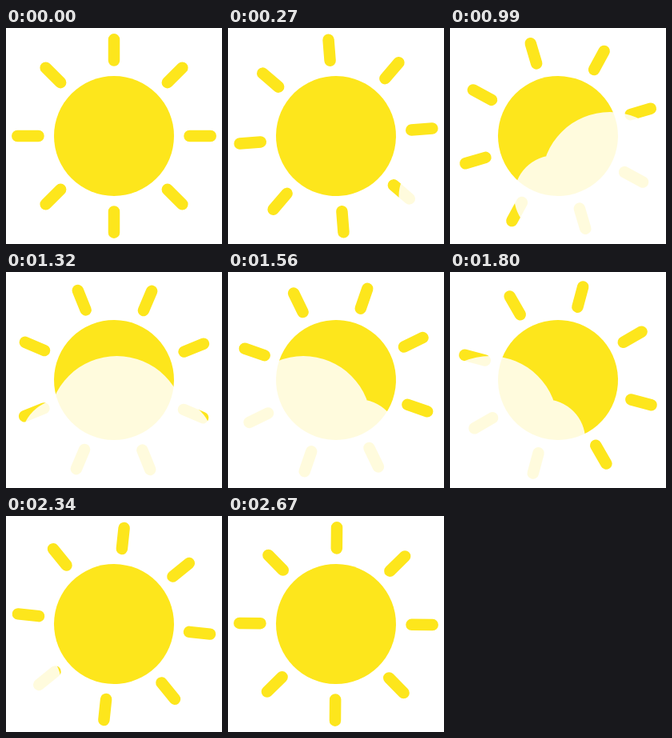
An HTML page with a canvas that plays this animation: 270 by 270 pixels, repeating every 2.7 s.

```html
<!DOCTYPE html>
<html>
<head>
<meta charset="utf-8">
<style>
  html, body { margin: 0; width: 100%; height: 100%; overflow: hidden; background: #fff; }
  canvas { display: block; width: 270px; height: 270px; }
</style>
</head>
<body>
<canvas width="270" height="270"></canvas>
<script>
const ctx = document.querySelector('canvas').getContext('2d');
const SIZE = 270, MID = SIZE / 2;
const LOOP = 2700, STEP = 30;
const YELLOW = '#fde61c';

function addCircle(path, x, y, r) {
  path.moveTo(x + r, y);
  path.arc(x, y, r, 0, Math.PI * 2);
}

function drawSun(angle) {
  ctx.save();
  ctx.translate(MID, MID);
  ctx.rotate(angle);
  ctx.fillStyle = ctx.strokeStyle = YELLOW;
  ctx.lineWidth = 14.5;
  ctx.lineCap = 'round';
  ctx.beginPath();
  ctx.arc(0, 0, 75, 0, Math.PI * 2);
  ctx.fill();
  ctx.beginPath();
  for (let i = 0; i < 8; i++) {
    const c = Math.cos(i * Math.PI / 4), s = Math.sin(i * Math.PI / 4);
    ctx.moveTo(94.5 * c, 94.5 * s);
    ctx.lineTo(120.7 * c, 120.7 * s);
  }
  ctx.stroke();
  ctx.restore();
}

// One path, so the overlapping lobes share a single translucent fill.
function drawCloud(x) {
  const cloud = new Path2D();
  addCircle(cloud, x, 190, 85);
  addCircle(cloud, x - 68.5, 210, 51);
  addCircle(cloud, x + 68.5, 210, 51);
  cloud.rect(x - 68.5, 210, 137, 51);
  ctx.save();
  ctx.beginPath();
  ctx.rect(0, 0, SIZE, 261);
  ctx.clip();
  ctx.fillStyle = 'rgba(255, 255, 255, 0.85)';
  ctx.fill(cloud);
  ctx.restore();
}

function render(now) {
  const t = Math.floor((now % LOOP) / STEP) * STEP;
  ctx.fillStyle = '#fff';
  ctx.fillRect(0, 0, SIZE, SIZE);
  drawSun(-Math.PI / 4 * t / LOOP);
  drawCloud(383 - 500 * t / LOOP);
}

const start = performance.now();
function tick() {
  render(performance.now() - start);
  requestAnimationFrame(tick);
}
tick();
</script>
</body>
</html>
```
